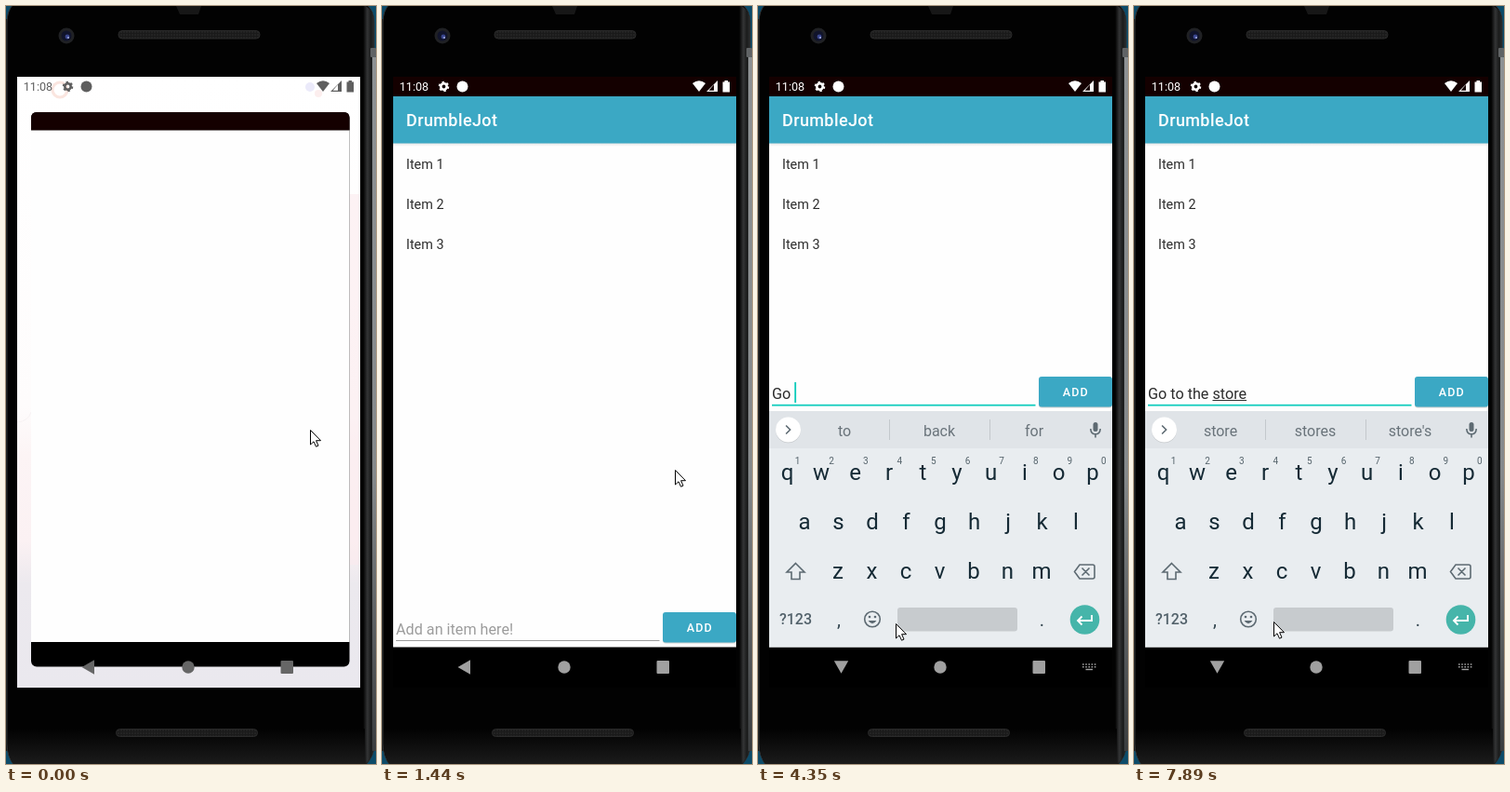
An HTML page for the animation above (8000 ms loop, 398x814 px).

```html
<!DOCTYPE html>
<html lang="en">
<head>
<meta charset="utf-8">
<title>To-do list demo</title>
<style>
  html, body { margin: 0; width: 100%; height: 100%; overflow: hidden; background: #000; }
  svg { display: block; width: 398px; height: 814px; }
  text { font-family: Roboto, "Open Sans", sans-serif; white-space: pre; }
  .mid { text-anchor: middle; }
  .line { fill: none; stroke: currentColor; stroke-width: 1.6; }
</style>
</head>
<body>
<svg viewBox="0 0 398 814" xmlns="http://www.w3.org/2000/svg">
  <defs>
    <linearGradient id="edge">
      <stop offset="0" stop-color="#000"/><stop offset=".4" stop-color="#343536"/>
      <stop offset=".7" stop-color="#1b1c1c"/><stop offset="1" stop-color="#2b2d2e"/>
    </linearGradient>
    <linearGradient id="rim" x2="0" y2="1">
      <stop offset="0" stop-color="#8d9193"/><stop offset=".6" stop-color="#85898b"/>
      <stop offset="1" stop-color="#3a3d3f"/>
    </linearGradient>
    <linearGradient id="chin" x2="0" y2="1">
      <stop offset="0" stop-color="#020202"/><stop offset="1" stop-color="#1b1b1b"/>
    </linearGradient>
    <linearGradient id="wall" x2="0" y2="1">
      <stop offset="0" stop-color="#fff"/><stop offset=".54" stop-color="#fefcfc"/>
      <stop offset=".62" stop-color="#fcf4f5"/><stop offset=".76" stop-color="#fbf1f3"/>
      <stop offset=".83" stop-color="#ece9ee"/><stop offset="1" stop-color="#eae8ee"/>
    </linearGradient>
    <linearGradient id="shade" x2="0" y2="1">
      <stop offset="0" stop-opacity=".1"/><stop offset="1" stop-opacity="0"/>
    </linearGradient>
    <pattern id="mesh" width="3" height="3" patternUnits="userSpaceOnUse">
      <rect width="3" height="3" fill="#1a1a1a"/><circle cx="1" cy="1" r=".8" fill="#2e2e2e"/>
    </pattern>
    <clipPath id="screen"><rect x="12" y="76" width="369" height="656"/></clipPath>
  </defs>

  <!-- phone body -->
  <rect width="398" height="814" fill="#0c4b69"/>
  <rect y="14" width="3" height="786" fill="#15191b"/>
  <path d="M8-2H387Q396 4 396 18V794Q396 806 386 816H9Q1 806 1 792V18Q1 5 8-2Z" fill="#020202" stroke="#303233"/>
  <path d="M384 0H387Q396 5 396 18V794Q396 805 387 814H384Z" fill="url(#edge)"/>
  <path d="M2 776H386V814H8Q2 806 2 792Z" fill="url(#chin)"/>
  <rect x="394" y="55" width="4" height="745" fill="url(#rim)"/>
  <rect x="392" y="45" width="6" height="10" rx="1" fill="#606365"/>
  <path d="M183 0H210L207 9H187Z" fill="#171717"/>
  <circle cx="65" cy="32" r="8.5" fill="#202124"/>
  <circle cx="65" cy="32" r="5.5" fill="#11142b"/>
  <circle cx="66" cy="33" r="2.4" fill="#3b478f"/>
  <circle cx="67" cy="34" r="1" fill="#a8b1e2"/>
  <g fill="url(#mesh)" stroke="#2a2a2a">
    <rect x="121" y="26.500" width="152" height="8.500" rx="4"/>
    <rect x="118.500" y="776.500" width="152" height="8" rx="4"/>
  </g>

  <g clip-path="url(#screen)">
    <!-- launch -->
    <g id="home">
      <rect x="12" y="76" width="369" height="656" fill="url(#wall)"/>
      <path d="M369 202H381V600H369Z" fill="#fcecef" opacity=".6"/>
      <path d="M12 447Q24 446 27 436" fill="none" stroke="#f7f2f3"/>
      <circle cx="58" cy="90" r="8" fill="#fff" stroke="#fae5df" stroke-width="3"/>
      <circle cx="327" cy="87" r="5" fill="#ebeafa"/>
      <circle cx="336" cy="94" r="4" fill="#fceeee"/>
    </g>
    <rect id="win" fill="#000"/>
    <path id="winTop" fill="#140000"/>
    <rect id="winMid" fill="#fefefe"/>

    <!-- app -->
    <g id="app">
      <rect x="12" y="147" width="369" height="4" fill="url(#shade)"/>
      <rect x="12" y="97" width="369" height="50.500" fill="#3ba8c4"/>
      <text x="26" y="129.300" font-size="18" font-weight="500" letter-spacing=".4" fill="#fff">DrumbleJot</text>
      <g id="items" font-size="14.400" fill="#2c2c2c"></g>
      <g id="entry">
        <rect id="rule" x="15" width="283.500"/>
        <text id="field" x="15" y="674.500" font-size="16.200"></text>
        <rect id="compose" y="676" height="1" fill="#333"/>
        <rect id="caret" y="657" width="1.800" height="22" fill="#03cbb9"/>
        <rect x="302" y="652" width="79" height="32.500" rx="3" opacity=".18"/>
        <rect x="302" y="651" width="79" height="32.500" rx="3" fill="#3ba8c4"/>
        <text x="341.800" y="672" class="mid" font-size="12.570" font-weight="500" letter-spacing="1.120" fill="#fff">ADD</text>
      </g>
    </g>

    <!-- status bar -->
    <g id="status">
      <text x="18.800" y="91" font-size="12.600" fill="currentColor">11:08</text>
      <circle cx="66.500" cy="86.500" r="3.200" fill="none" stroke="currentColor" stroke-width="2.600"/>
      <circle cx="66.500" cy="86.500" r="4.800" fill="none" stroke="currentColor" stroke-width="1.900" stroke-dasharray="2.400 2.627"/>
      <g fill="currentColor">
        <circle cx="86.500" cy="86.500" r="6"/>
        <path d="M334 83Q341 77.500 348 83L341 92Z"/>
        <path d="M349 92L361 80V92ZM357 84.500L351.600 90.800H357Z" fill-rule="evenodd"/>
        <path d="M366.500 81.500H368.500V80H372V81.500H374V92.500H366.500Z"/>
      </g>
    </g>

    <!-- navigation -->
    <g id="nav" fill="currentColor">
      <path id="back" d="M81.500 710L95 702.300V717.700Z"/>
      <circle cx="196" cy="710" r="6.700"/>
      <rect x="295.500" y="703" width="13.500" height="14" rx="1"/>
      <g id="keysIcon" stroke="currentColor" fill="none" stroke-width="1.400">
        <path d="M349 707H363.500M349 709.700H363.500" stroke-dasharray="1.600 1.600"/>
        <path d="M352.500 712.500H360"/>
      </g>
    </g>

    <!-- keyboard -->
    <g id="kb" color="#5d6a72">
      <rect x="12" y="435" width="369" height="253.500" fill="#e9edf0"/>
      <rect x="12" y="435" width="369" height="40" fill="#e0e4e8"/>
      <circle cx="32.500" cy="455.800" r="13.500" opacity=".12"/>
      <circle cx="32.500" cy="455" r="13.500" fill="#fff"/>
      <path id="chevron" class="line" d="M34.500 450.500L30 455L34.500 459.500"/>
      <g id="tools">
        <circle cx="80.500" cy="453.500" r="4.700" class="line"/>
        <path d="M84 457L89.500 462.500" class="line"/>
        <path d="M130.500 448.500H141.500Q143 448.500 143 450V457L138 462H130.500Q129 462 129 460.500V450Q129 448.500 130.500 448.500ZM138 462V457H143M132.500 456Q135 459 137 456.500M133 452.500V453.500M138.500 452.500V453.500" class="line"/>
        <text x="189" y="459.500" class="mid" font-size="12" font-weight="900" letter-spacing=".8" fill="currentColor">GIF</text>
        <rect x="237" y="447" width="16" height="16" rx="1" fill="currentColor"/>
        <path d="M277 445V466" stroke="#c6cbcf"/>
        <g fill="currentColor"><circle cx="304.500" cy="455.500" r="1.900"/><circle cx="310" cy="455.500" r="1.900"/><circle cx="315.500" cy="455.500" r="1.900"/></g>
      </g>
      <g id="hints" font-size="16" fill="#69737a">
        <path d="M141.500 444V466M249.500 444V466" stroke="#c3c8cc"/>
      </g>
      <rect x="360.500" y="447" width="5" height="10" rx="2.500" fill="currentColor"/>
      <path d="M357.800 454Q358 459.800 363 459.800T368.200 454M363 460V463.500" class="line"/>

      <g id="keys" font-size="24" fill="#152a35"></g>
      <path d="M40.500 598.500L50 608H45V615.500H36V608H31Z" class="line"/>
      <path d="M346 600H360Q362 600 362 602V613Q362 615 360 615H346L340.500 607.500ZM348.500 603.500L356.500 611.500M356.500 603.500L348.500 611.500" class="line"/>
      <text x="40.500" y="664.300" class="mid" font-size="16" font-weight="500" fill="#53626b">?123</text>
      <text x="87" y="666" class="mid" font-size="20" fill="#33454f">,</text>
      <text x="305.500" y="666" class="mid" font-size="20" fill="#33454f">.</text>
      <circle cx="123" cy="658.500" r="8.300" class="line"/>
      <path d="M118.500 660Q123 666.500 127.500 660Z" fill="currentColor"/>
      <circle cx="120" cy="656" r="1.300" fill="currentColor"/><circle cx="126" cy="656" r="1.300" fill="currentColor"/>
      <rect x="150" y="646" width="129" height="25.500" rx="3" fill="#c7cbce"/>
      <circle cx="351.500" cy="659" r="15.800" fill="#46b5aa"/>
      <path d="M359 654V660H344.500M348.500 655.500L344 660L348.500 664.500" fill="none" stroke="#fff" stroke-width="1.900"/>
    </g>
  </g>

  <path id="cursor" d="M.5.5V16L4 12.800 6.500 18.200 9 17.100 6.600 11.700H11.500Z" fill="#fff" stroke="#000"/>
</svg>

<script>
const LOOP = 8000;
const $ = id => document.getElementById(id);
const set = (el, attrs) => { for (const k in attrs) el.setAttribute(k, attrs[k]); };
const show = (el, on) => { el.style.display = on ? '' : 'none'; };

function label(parent, x, y, str, attrs = {}) {
  const el = document.createElementNS('http://www.w3.org/2000/svg', 'text');
  set(el, { x, y, ...attrs });
  el.textContent = str;
  return parent.appendChild(el);
}

// Rows start with their time; the last row already reached is in force.
const at = (rows, t) => rows.reduce((hit, row) => row[0] <= t ? row : hit);

const pointer = [
  [0, 327, 455], [270, 325, 455], [630, 325, 454], [1050, 327, 457], [1170, 323, 478],
  [1290, 317, 499], [1440, 315, 498], [1590, 302, 518], [1710, 266, 562], [1830, 216, 614],
  [1950, 171, 650], [2070, 150, 657], [2340, 148, 663], [7890, 150, 661]
];
// time, x, y, width, height, radius, top strip, end of white
const launch = [
  [0, 27, 114, 342.5, 595.5, 6, 19.5, 683],
  [120, 13.5, 80, 365.5, 650, 3, 20.5, 687],
  [270, 12, 76, 369, 656, 0, 21, 688.5]
];
const fade = [[0, 0], [780, .31], [900, 1]];
const navTone = [[0, 102], [270, 150], [630, 236], [780, 232], [1050, 212], [1170, 186], [1290, 160]];
const backTurn = [[0, 0], [2490, -75], [2610, -90]];
// time, opacity, drop
const board = [[0, 0, 0], [2490, .72, 17], [2610, 1, 0]];
const blink = [
  [0, 0], [2340, 1], [2880, 0], [3390, 1], [3840, 0],
  [4080, 1], [5730, 0], [6270, 1], [7770, 0]
];
// time, settled text, word being typed, suggestions
const typing = [
  [0, '', '', ''],
  [4080, '', 'G', 'G Good Got'],
  [4200, '', 'Go', 'Go Good Got'],
  [4350, 'Go ', '', 'to back for'],
  [4620, 'Go ', 'to', 'to too tomorrow'],
  [4890, 'Go to ', '', 'the bed my'],
  [5040, 'Go to ', 'th', 'th the that'],
  [5160, 'Go to ', 'the', 'the they that'],
  [5310, 'Go to the ', '', 'store gym bank'],
  [6810, 'Go to the ', 's', 's store school'],
  [7080, 'Go to the ', 'sto', 'sto store stop'],
  [7200, 'Go to the ', 'store', "store stores store's"]
];

[1, 2, 3].forEach(n => label($('items'), 26, 131.5 + 43 * n, 'Item ' + n));
[['qwertyuiop', 31.5, 509], ['asdfghjkl', 50, 562], ['zxcvbnm', 86, 615]].forEach(([row, x, y]) =>
  [...row].forEach((ch, i) => label($('keys'), x + 36.5 * i, y, ch, { class: 'mid' })));
[...'1234567890'].forEach((ch, i) =>
  label($('keys'), 42.5 + 36.6 * i, 491.5, ch, { class: 'mid', 'font-size': 10, fill: '#55636b' }));
const words = [93, 195, 297].map(x => label($('hints'), x, 461.5, '', { class: 'mid' }));

const pen = document.createElement('canvas').getContext('2d');
pen.font = '16.2px Roboto, "Open Sans", sans-serif';
const widthOf = str => pen.measureText(str).width;

function drawLaunch(t) {
  const [, x, y, w, h, r, top, end] = at(launch, t);
  set($('win'), { x, y, width: w, height: h, rx: r });
  set($('winTop'), { d: `M${x} ${y + top}V${y + r}q0-${r} ${r}-${r}H${x + w - r}q${r} 0 ${r} ${r}V${y + top}Z` });
  set($('winMid'), { x, y: y + top, width: w, height: end - y - top });
  show($('home'), t < 270);
  $('status').style.color = t < 270 ? '#5f5f5f' : '#fff';
}

function drawEntry(t) {
  const [, done, word, list] = at(typing, t);
  const focus = t >= 2340, text = done + word;
  set($('entry'), { transform: `translate(0 ${t >= 2490 ? -253 : 0})` });
  set($('rule'), focus ? { y: 680.8, height: 1.8, fill: '#14cdbf' } : { y: 681, height: 1, fill: '#9b9b9b' });
  $('field').textContent = text || 'Add an item here!';
  set($('field'), { fill: text ? '#2c2c2c' : '#9c9c9c' });
  set($('compose'), { x: 15 + widthOf(done), width: widthOf(text) - widthOf(done) });
  set($('caret'), { x: 15 + widthOf(text) });
  show($('caret'), at(blink, t)[1]);

  show($('tools'), !list);
  show($('hints'), list);
  list.split(' ').forEach((s, i) => { words[i].textContent = s; });
  set($('chevron'), { transform: list ? 'rotate(180 32.300 455)' : '' });
}

function draw(t) {
  drawLaunch(t);
  drawEntry(t);
  set($('app'), { opacity: at(fade, t)[1] });

  const tone = at(navTone, t)[1];
  $('nav').style.color = `rgb(${tone},${tone},${tone})`;
  set($('back'), { transform: `rotate(${at(backTurn, t)[1]} 88.900 709.400)` });
  show($('keysIcon'), t >= 2490);

  const [, alpha, drop] = at(board, t);
  set($('kb'), { opacity: alpha, transform: `translate(0 ${drop})` });

  const [, x, y] = at(pointer, t);
  set($('cursor'), { transform: `translate(${x} ${y})` });
}

const start = performance.now();
function tick() {
  draw((performance.now() - start) % LOOP);
  requestAnimationFrame(tick);
}
tick();
</script>
</body>
</html>
```
